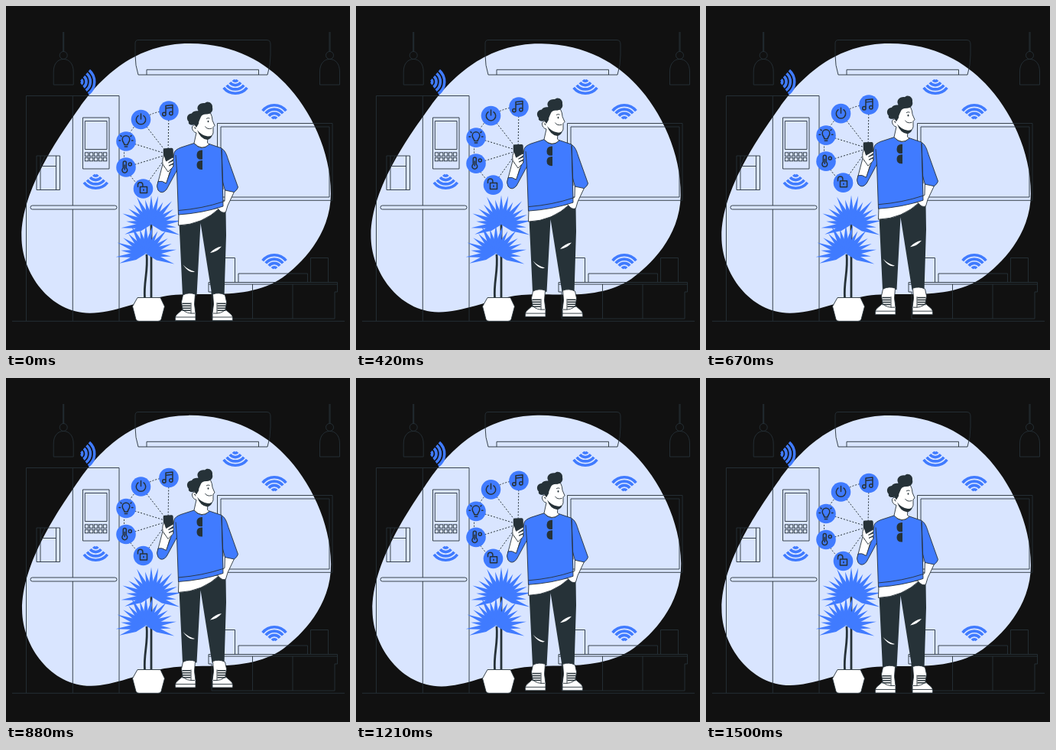
These frames come from a looping animation (450x450 px, 1.54 s). An HTML page:

```html
<!DOCTYPE html>
<html lang="en">
<head>
<meta charset="utf-8">
<style>
  html, body { margin: 0; height: 100%; overflow: hidden; background: #111; }
  svg { display: block; width: 100vw; height: 100vh; }
  .line, .icon, .dash, .wifi, .laces { fill: none; stroke: #263238; }
  .line { stroke-width: .9; }
  .dark { fill: #263238; }
  .blue { fill: #407bff; }
  .skin, .cloth { fill: #fff; stroke: #263238; stroke-width: .9; stroke-linejoin: round; }
  .cloth { fill: #407bff; }
  .wifi { stroke: #407bff; stroke-width: 3.6; }
  .icon { stroke-width: 1.5; stroke-linecap: round; stroke-linejoin: round; }
  .dash { stroke-dasharray: 2 2; }
  .laces { stroke-width: 11; stroke-dasharray: 1.5; }
</style>
</head>
<body>
<svg viewBox="0 0 450 450">
  <defs>
    <g id="lamp" class="line">
      <path d="M-.5 34V60M.5 34V60M-13 103V86C-13 75 -7 69.500 0 69.500S13 75 13 86V103Z"/>
      <circle cy="64.500" r="5"/>
    </g>
    <g id="shoe">
      <path class="skin" d="M231.500 378Q239 374 247.500 377L246.500 390L248 402V411.500H221.500Q220.500 406 224 403L231 397L229.500 387Z"/>
      <path class="line" d="M221.500 407H248M242 388V402M231 397Q236 403 247 402"/>
      <path class="laces" d="M236 388.500V399.500"/>
    </g>
  </defs>

  <path id="blob" fill="#d9e5ff" d="M240 49C300 49 340 75 365 101C398 135 425 190 425 245C425 300 385 338 362 355C335 374 300 377 265 377C240 377 222 377 206 380C175 386 140 402 110 402C58 402 20.500 350 20.500 302C20.500 240 70 170 96 133C125 92 170 49 240 49Z"/>

  <g id="room" class="line">
    <path d="M8 412.300H443"/>
    <path d="M173 44.500H341Q346 44.500 346 50V64Q346 78 342 90H173Q169 78 169 64V49Q169 44.500 173 44.500ZM184 90V83.300H330.500V90"/>
    <path d="M26.500 412V117.500H148V412M87.300 117.500V412"/>
    <rect x="32" y="261" width="113" height="5" rx="2.500" fill="#d9e5ff"/>
    <path d="M100.500 146H135V213H100.500ZM103.300 150.500H132V187.500H103.300Z"/>
    <path d="M40 196H70.500V240.500H40ZM45 196V240.500M65.500 196V240.500M45 209.500H65.500M51 196L45 209.500"/>
    <path d="M276.500 153.500H427V254.300H276.500ZM281 158H423V250H281Z"/>
    <path d="M265 361.500H433.500V374H430V409H269V374H265ZM322.500 364V409M375 364V409M265 364H433.500"/>
    <path d="M304 361V350H394.500V361M398.500 361.500V329.500H421.500V361.500M277 361.500V329.500H299.500V361.500"/>
    <use href="#lamp" x="75.200"/><use href="#lamp" x="423.500"/>
  </g>

  <g id="signals"></g>

  <g id="plant">
    <path d="M181.500 382C180 360 186 348 184 325M190 382V285" fill="none" stroke="#263238" stroke-width="2.800"/>
    <path class="skin" d="M172 381.500H202L207.500 393L203 410Q202 412.300 199 412.300H174Q171 412.300 170 410L165.500 393Z"/>
  </g>

  <g id="floating">
    <path class="dash" d="M213 137A59 59 0 0 0 157 177Q152 194 157 211Q164 228 179.500 239"/>
    <g id="controls"></g>

    <!-- legs -->
    <path class="dark" d="M226.500 284L280 263L287.500 267L288 300L285.500 380Q277 376 269.500 379L254.500 284L249.500 379Q240 376 231 379Z"/>
    <path fill="#fff" d="M231.500 338.500Q238 345 247 347.500Q240 350.500 231.500 338.500ZM267 323Q273 316 282 314.500Q276 322 267 323Z"/>
    <use href="#shoe"/><use href="#shoe" transform="translate(518) scale(-1 1)"/>

    <!-- torso -->
    <path class="skin" d="M226 271L225.500 287Q257 286 280 264Z"/>
    <path class="skin" d="M286.500 238L299.500 241L290 261L287.500 269.500Q283 272 278 266L275 263Q281 257 286 255Z"/>
    <path class="cloth" d="M281 186C287 188 289 196 291 202L303.500 237Q303 240 298.500 243.500L286.500 241L282 225Z"/>
    <path class="skin" d="M198.500 232L205 207L218 203L219 210L214 218L209.500 234Z"/>
    <path class="cloth" d="M246 179.500L229 185Q221 188 220 192L217 211L209.500 232Q204 228 199 229.500Q196 236 199 241Q204 247 210 240L223.500 215L225.500 273Q257 271 284 262L282 186L266 180.500Q256 191 246 179.500Z"/>
    <path class="line" d="M225.500 267.500Q257 265 284 256M223.500 215L222 195M282 188L284 240"/>
    <path class="dark" d="M257 188.500V200.500Q249.500 202 249.500 195T257 188.500ZM257 202V214Q249.500 214.500 249.500 208T257 202Z"/>

    <!-- hand and phone -->
    <rect class="dark" x="206" y="186" width="13" height="25" rx="2" transform="rotate(-2 212 198)"/>
    <path class="skin" d="M205 207Q204 199 207 195.500L209.500 203L218 198Q220.500 199 218.500 201L212.500 205L218.500 202.500Q220.500 204 218.500 206L213 209L218 207Q220 208.500 218 211L212 217Z"/>

    <!-- head -->
    <path class="skin" d="M267.500 140Q270 145 270 149.500L273 156.500L271 158.500V166Q270 171 264 171.500L263.500 179L266 181Q256 190 246 179.500L249 166Q243 164 243.500 158Q246 154 249 157L251 141Z"/>
    <path class="dark" d="M249 159L246.500 155C241 157 238 154 239 151.500C235 147 237 141 243 140.500C246 136 250 138 251.500 137C248 131 254 126 260 127C264 123 271 127 270 133C271.500 138 267 142 262 141.500C258 141.500 256 143 255 145C254 148 252 150 252 154Z"/>
    <path class="dark" d="M250 162Q255 169 264 170.500Q268 171 270 169Q268 174 263.500 175Q254 174 250 162Z"/>
    <ellipse class="dark" cx="264.500" cy="151" rx=".9" ry="1.300"/>
    <path class="line" d="M262 147.500Q264 145.800 266.500 147M260.500 157.500Q263 162 269.500 160M246 159Q248 158 248 161"/>
  </g>
</svg>
<script>
  const PERIOD = 1540, LEAD = 50;
  const get = id => document.getElementById(id);
  const add = (id, markup) => get(id).insertAdjacentHTML('beforeend', markup);
  const range = (n, f) => Array.from({ length: n }, (_, i) => f(i)).join('');

  const arc = r => `M${-r * .78} ${-r * .626}A${r} ${r} 0 0 1 ${r * .78} ${-r * .626}`;
  const wifi = (x, y, turn) => add('signals',
    `<path class="wifi" d="${range(4, i => arc(3.8 + 5.3 * i))}" transform="translate(${x} ${y}) rotate(${turn})"/>`);
  wifi(300, 94.5, 180);
  wifi(351, 149.5, 0);
  wifi(351, 345.5, 0);
  wifi(117.3, 218.5, 180);
  wifi(96, 99, 92);

  add('room', range(10, i =>
    `<rect x="${103.3 + i % 5 * 6}" y="${i < 5 ? 191.8 : 198.3}" width="4.500" height="4.500"/>`));

  // A disc with its icon, joined to the phone by a dashed spoke.
  const control = (x, y, icon) => add('controls',
    `<path class="dash" d="M${x} ${y}L212 194"/><g transform="translate(${x} ${y})">
     <circle class="blue" r="12.800"/><path class="icon" d="${icon}"/></g>`);
  const ring = (x, y, r) => `M${x - r} ${y}a${r} ${r} 0 1 0 ${2 * r} 0a${r} ${r} 0 1 0 ${-2 * r} 0`;
  control(213, 137, `M-4 4.500V-6.500L5 -7.500V3.500M-4 -3.300L5 -4.300${ring(-6.1, 4.5, 2.2)}${ring(2.9, 3.5, 2.2)}`);
  control(176.5, 148.5, 'M-3.500 -5A6.200 6.200 0 1 0 3.500 -5M0 -7.500V-.5');
  control(157, 177, 'M-2.200 4.500C-2 2 -4.800 1 -4.800 -2.500A4.800 4.800 0 0 1 4.800 -2.500C4.800 1 2 2 2.200 4.500ZM-1.700 7H1.700M-9 -1H-7.500M7.500 -1H9M-7 -7.500L-6 -6.500M7 -7.500L6 -6.500');
  control(157, 211, `M-3.700 1V-6A2 2 0 0 1 .3 -6V1A3.400 3.400 0 1 1 -3.700 1M-1.700 -3V3${ring(5.3, -4, 2)}`);
  control(179.5, 239, 'M-4 -2.500H5V5.500H-4ZM-7 -2.500V-5A3.200 3.200 0 0 1 -.6 -5V-2.500M.5 1V2.200');

  // A crown of thin kite leaves spread over the upper half.
  const LEAVES = 17;
  const crown = (x, y) => add('plant', range(LEAVES, i => {
    const length = 37 + 4 * Math.sin(i * 2.4);
    const angle = -200 + 220 * i / (LEAVES - 1);
    return `<path class="blue" d="M0 0L${length * .4} 3.200L${length} 0L${length * .4} -3.200Z" transform="translate(${x} ${y}) rotate(${angle})"/>`;
  }));
  crown(190, 286);
  crown(183, 324);

  const triangle = p => 1 - Math.abs(1 - 2 * (p % 1));
  function draw(now) {
    const p = (now + LEAD) / PERIOD;
    get('floating').setAttribute('transform', `translate(0 ${.6 - 9 * triangle(p)})`);
    get('blob').setAttribute('transform', `rotate(${2 * triangle(p + .25) - 1} 222.5 225.5)`);
  }
  const start = performance.now();
  function tick() {
    draw(performance.now() - start);
    requestAnimationFrame(tick);
  }
  tick();
</script>
</body>
</html>
```
